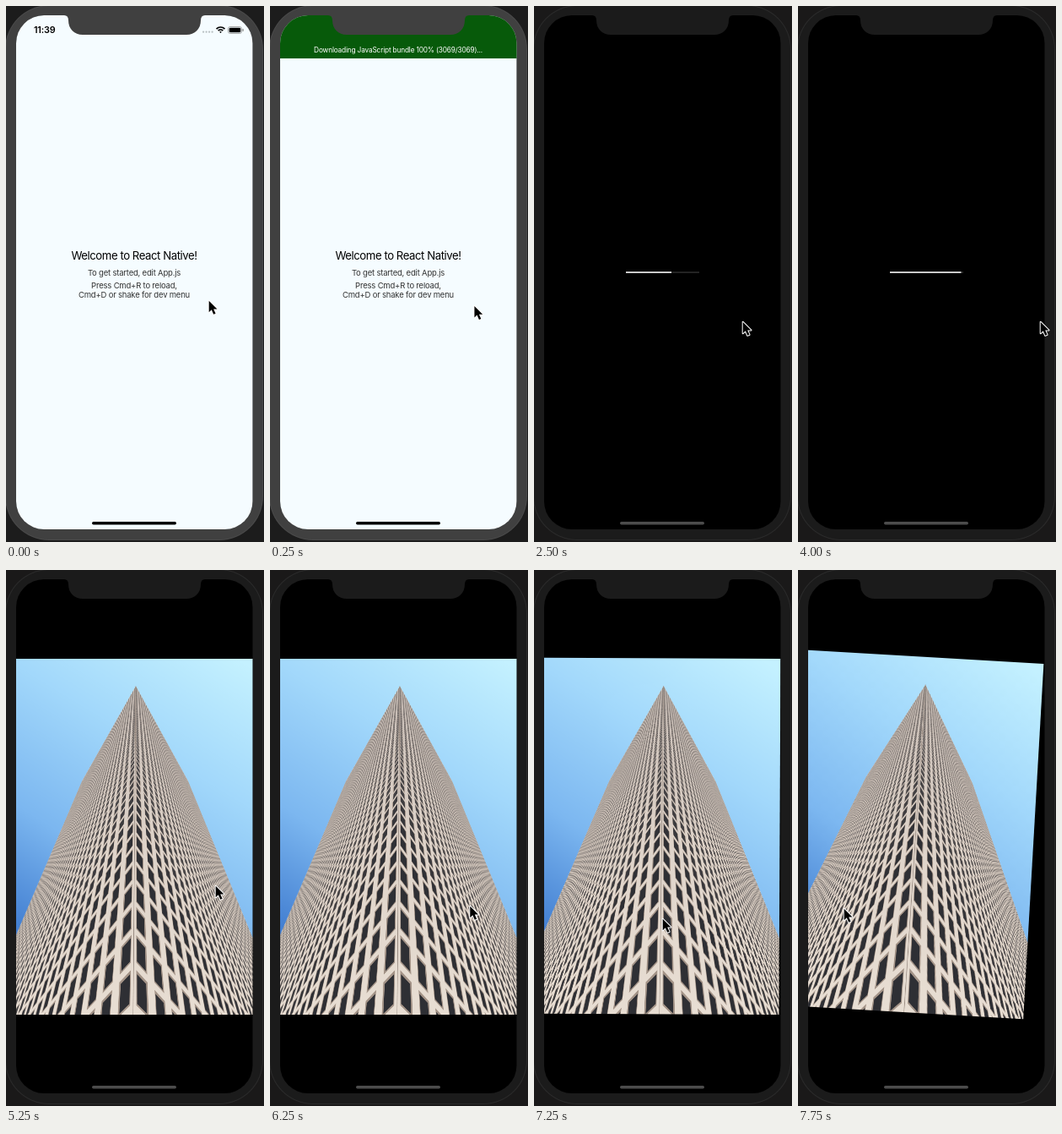
An HTML page with a canvas that plays this animation: 306 by 634 pixels, repeating every 8 s.

```html
<!DOCTYPE html>
<html lang="en">
<head>
<meta charset="utf-8">
<title>Photo viewer on a phone</title>
<style>
html, body { margin: 0; width: 100%; height: 100%; overflow: hidden; background: #1a1919; }
canvas { display: block; width: 306px; height: 634px; }
</style>
</head>
<body>
<canvas id="stage" width="306" height="634"></canvas>
<script>
const ctx = document.getElementById('stage').getContext('2d');
const LOOP = 8000, STEP = 250;
const FONT = 'Inter, "Liberation Sans", sans-serif';
const MID = 152;

// Linear interpolation through [position, value] pairs.
function track(at, keys) {
  if (at <= keys[0][0]) return keys[0][1];
  for (let i = 1; i < keys.length; i++) {
    const [a, from] = keys[i - 1], [b, to] = keys[i];
    if (at <= b) return from + (to - from) * (at - a) / (b - a);
  }
  return keys[keys.length - 1][1];
}

const cursorX = [[0, 240], [1000, 247], [2500, 247], [3750, 259], [4000, 287], [4250, 297],
  [4500, 297], [4750, 285], [5250, 248], [5500, 248], [6750, 229], [7250, 152], [7750, 54]];
const cursorY = [[0, 348], [1000, 373], [5500, 373], [6750, 413], [7250, 412], [7750, 400]];
const progressEnd = [[750, 109], [1000, 114], [2500, 163], [4000, 193.5]];
const bannerLift = [[1000, 0], [1500, 52]];
const swipe = [[7000, 0], [7250, 0.08], [7500, 0.45], [7750, 1]];

function box(c, x, y, w, h, r, fill) {
  c.fillStyle = fill;
  c.beginPath();
  c.roundRect(x, y, w, h, r);
  c.fill();
}

function label(text, x, y, size, spacing, color, align = 'center', weight = 400) {
  ctx.font = `${weight} ${size}px ${FONT}`;
  ctx.letterSpacing = spacing + 'px';
  ctx.textAlign = align;
  ctx.fillStyle = color;
  ctx.fillText(text, x, y);
}

// The tower: two flat faces meeting at a corner, seen from below in perspective.
function paintPhoto() {
  const photo = document.createElement('canvas');
  photo.width = 560;
  photo.height = 842;
  const c = photo.getContext('2d');
  c.scale(2, 2);
  c.translate(-12, -104.5);

  const sky = c.createLinearGradient(270, 104, 60, 450);
  sky.addColorStop(0, '#c4f1ff');
  sky.addColorStop(0.35, '#a2d8fb');
  sky.addColorStop(0.7, '#7cb7f0');
  sky.addColorStop(1, '#4480d2');
  c.fillStyle = sky;
  c.fillRect(12, 104, 280, 422);

  const wall = c.createLinearGradient(0, 137, 0, 526);
  wall.addColorStop(0, '#c9bfb8');
  wall.addColorStop(0.5, '#dfd4ca');
  wall.addColorStop(1, '#e8ded3');

  const COLUMNS = 31, ROOF = 79;
  const wallPoint = (side, column, floor) => {
    const depth = floor + 0.4 * column;
    const y = 100 + (2930 + 346 * column) / depth;
    return [154 - 0.008 * (y - 100) + side * 185 * column / depth, y];
  };
  const pane = (side, left, right, low, high, fill) => {
    c.fillStyle = fill;
    c.beginPath();
    c.moveTo(...wallPoint(side, left, low));
    c.lineTo(...wallPoint(side, right, low));
    c.lineTo(...wallPoint(side, right, high));
    c.lineTo(...wallPoint(side, left, high));
    c.fill();
  };

  for (const side of [-1, 1]) {
    pane(side, 0, COLUMNS, 3, ROOF, wall);
    for (let floor = 5; floor < ROOF - 1; floor++) {
      for (let column = 0; column < COLUMNS; column++) {
        c.globalAlpha = Math.min(1, 0.4 + 8 / (floor + 0.4 * column));
        pane(side, column + 0.14, column + 0.74, floor + 0.12, floor + 0.92, '#a39387');
        pane(side, column + 0.18, column + 0.66, floor + 0.17, floor + 0.84, '#2e2f34');
      }
    }
    c.globalAlpha = 1;
  }
  c.strokeStyle = '#9a8c82';
  c.lineWidth = 0.7;
  c.beginPath();
  c.moveTo(...wallPoint(1, 0, ROOF));
  c.lineTo(...wallPoint(1, 0, 6));
  c.stroke();
  return photo;
}
const photo = paintPhoto();

function drawWelcome() {
  ctx.fillStyle = '#f5fcff';
  ctx.fillRect(12, 11, 281, 608);
  label('Welcome to React Native!', MID, 300, 13.2, -0.45, '#000');
  label('To get started, edit App.js', MID, 319, 9.5, -0.2, '#333');
  label('Press Cmd+R to reload,', MID, 334, 9.5, -0.2, '#333');
  label('Cmd+D or shake for dev menu', MID, 345, 9.5, -0.2, '#333');
}

function drawStatus() {
  label('11:39', 33, 32, 10.8, -0.2, '#000', 'left', 600);
  for (let i = 0; i < 4; i++) box(ctx, 233 + i * 3.5, 29.5, 2.2, 2.2, 1, '#b9c0c3');
  ctx.strokeStyle = '#000';
  ctx.lineWidth = 1.7;
  for (const r of [1, 4, 7]) {
    ctx.beginPath();
    ctx.arc(254.5, 32, r, -Math.PI * 0.75, -Math.PI * 0.25);
    ctx.stroke();
  }
  ctx.lineWidth = 0.7;
  ctx.strokeStyle = '#888';
  ctx.beginPath();
  ctx.roundRect(263.5, 24.5, 16, 8, 2.3);
  ctx.stroke();
  box(ctx, 264.7, 25.7, 13.6, 5.6, 1.3, '#000');
  box(ctx, 280.5, 27, 1.2, 3, 0.6, '#888');
}

function drawLoading(t) {
  ctx.fillStyle = '#2e2e2e';
  ctx.fillRect(109, 314.3, 87, 1.5);
  ctx.fillStyle = t < 1250 ? '#aaa' : '#fff';
  ctx.fillRect(109, 314.3, track(t, progressEnd) - 109, 1.5);
  if (t >= 1250) return;
  ctx.lineWidth = 2;
  ctx.lineCap = 'round';
  for (let i = 0; i < 12; i++) {
    const angle = (i - 3 + (t - 1000) / 83) * Math.PI / 6;
    const shade = i > 5 ? 40 + (i - 5) * 11 : 40;
    ctx.strokeStyle = `rgb(${shade},${shade},${shade})`;
    ctx.beginPath();
    ctx.moveTo(MID + 6 * Math.cos(angle), 315 + 6 * Math.sin(angle));
    ctx.lineTo(MID + 10.5 * Math.cos(angle), 315 + 10.5 * Math.sin(angle));
    ctx.stroke();
  }
  ctx.lineCap = 'butt';
}

function drawBanner(t) {
  const lift = track(t, bannerLift);
  ctx.fillStyle = '#075a0a';
  ctx.fillRect(12, 11 - lift, 281, 51);
  label('Downloading JavaScript bundle 100% (3069/3069)...', MID, 55 - lift, 8.3, -0.18, '#fff');
}

function drawPhoto(t) {
  const pull = track(t, swipe);
  ctx.save();
  ctx.translate(MID - 13 * pull, 315 - 2 * pull);
  ctx.rotate(3.3 * pull * Math.PI / 180);
  ctx.drawImage(photo, -140, -210.5, 280.5, 421);
  ctx.restore();
}

function drawNotch(color) {
  ctx.fillStyle = color;
  ctx.beginPath();
  ctx.moveTo(69, 10);
  ctx.lineTo(69, 11);
  ctx.quadraticCurveTo(74, 11, 74, 17);
  ctx.bezierCurveTo(74, 27, 81, 34, 91, 34);
  ctx.lineTo(214, 34);
  ctx.bezierCurveTo(224, 34, 231, 27, 231, 17);
  ctx.quadraticCurveTo(231, 11, 236, 11);
  ctx.lineTo(236, 10);
  ctx.fill();
}

function drawCursor(x, y) {
  ctx.save();
  ctx.translate(x, y);
  ctx.beginPath();
  [[0.7, 0.8], [0.7, 14.2], [3.8, 11.3], [6.2, 16.8], [8.6, 15.8], [6.2, 10.4], [10.5, 10.4]]
    .forEach(p => ctx.lineTo(...p));
  ctx.closePath();
  ctx.lineJoin = 'round';
  ctx.lineWidth = 2;
  ctx.strokeStyle = '#fff';
  ctx.stroke();
  ctx.fillStyle = '#000';
  ctx.fill();
  ctx.restore();
}

function draw(t) {
  const welcome = t < 750;
  const bezel = welcome ? '#404040' : '#1b1b1b';
  ctx.fillStyle = welcome ? '#1c1c1c' : '#1a1919';
  ctx.fillRect(0, 0, 306, 634);
  box(ctx, -1, -1, 306, 633, 52, welcome ? '#4a4a4a' : '#2b2b2b');
  box(ctx, 0, 0, 304, 631, 51, bezel);

  ctx.save();
  ctx.beginPath();
  ctx.roundRect(12, 11, 280.5, 608, 33);
  ctx.clip();
  ctx.fillStyle = '#000';
  ctx.fillRect(12, 11, 281, 608);
  if (welcome) drawWelcome();
  else if (t < 4250) drawLoading(t);
  else drawPhoto(t);
  if (t < STEP) drawStatus();
  else if (t < 1500) drawBanner(t);
  box(ctx, 102, 610, 100, 3.5, 1.7, welcome ? '#000' : '#4c4c4c');
  ctx.restore();

  drawNotch(bezel);
  drawCursor(track(t, cursorX), track(t, cursorY));
}

function tick() {
  const t = performance.now() % LOOP;
  draw(Math.floor(t / STEP) * STEP);
  requestAnimationFrame(tick);
}
tick();
</script>
</body>
</html>
```
